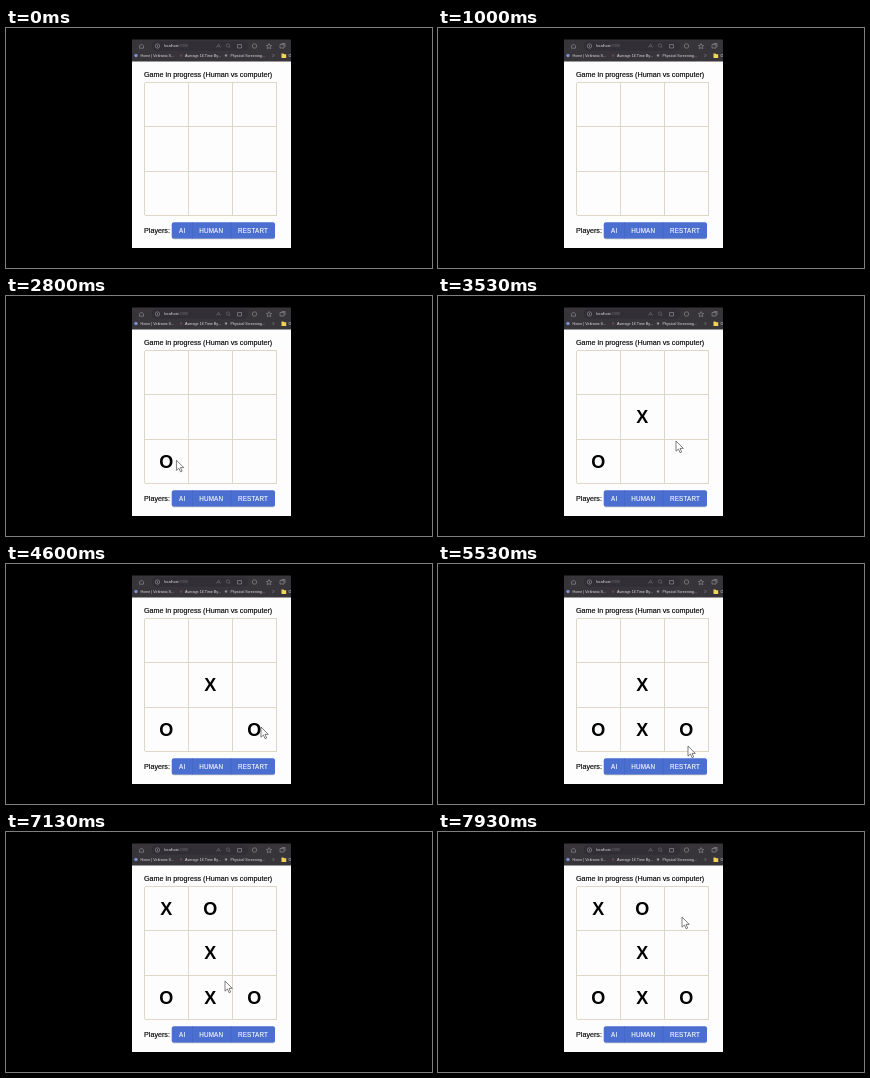
An HTML page for the animation above (8 s loop, 426 px wide and 240 px high).

```html
<!DOCTYPE html>
<html lang="en">
<head>
<meta charset="utf-8">
<title>Tic-tac-toe</title>
<style>
html, body { margin: 0; width: 100%; height: 100%; overflow: hidden; background: #000; }
svg { display: block; width: 100vw; height: 100vh; font-family: "Liberation Sans", Arial, sans-serif; }
.page { font-size: 7.2px; fill: #000; stroke: #000; stroke-width: .15; }
.button { font-size: 6.3px; letter-spacing: .18px; fill: #fff; stroke: #fff; stroke-width: .1; }
.mark { font-size: 18px; font-weight: bold; text-anchor: middle; fill: #000; }
.tiny { font-size: 3.7px; fill: #e4e2e6; }
.icon { fill: none; stroke: #99969c; stroke-width: .6; }
</style>
</head>
<body>
<svg viewBox="0 0 426 240">
  <defs><clipPath id="window"><path d="M126 11h159v209H126z"/></clipPath></defs>
  <path d="M0 0h426v240H0z"/>
  <g clip-path="url(#window)">
    <path d="M126 33h159v187H126z" fill="#fdfdfd"/>
    <path d="M126 11.500h159v22H126z" fill="#37343a"/>
    <rect x="146" y="13.500" width="96" height="9" rx="4" fill="#312e35"/>
    <g class="icon">
      <path d="M133.500 18l2-2 2 2v2.200h-4z"/>
      <circle cx="151.500" cy="18" r="2.200"/><path d="M151.500 17v2.300"/>
      <g opacity=".6">
        <path d="M210.500 19.500l2-3.500 2 3.500M211 18.500h3"/>
        <circle cx="222" cy="17.500" r="1.700"/><path d="M223.200 18.700l1.300 1.300"/>
      </g>
      <path d="M231.500 16.500h4v3.500h-4z"/>
      <circle cx="248.500" cy="18" r="2.200"/>
      <path d="M263 15.500l.8 1.800 1.900.2-1.400 1.300.4 1.900-1.700-1-1.700 1 .4-1.900-1.400-1.300 1.900-.2z"/>
      <path d="M274 16.500h4v3.500h-4zM275.500 15.500h3.500v3.500"/>
      <path d="M266.500 26l1.500 1.500-1.500 1.500"/>
    </g>
    <g class="tiny">
      <text x="158" y="19.300">localhost<tspan fill="#77747b">:3000</tspan></text>
      <circle cx="130" cy="27.500" r="1.700" fill="#7f8fd0"/>
      <text x="134.500" y="28.900">Home | Veltranix S...</text>
      <circle cx="175" cy="27.500" r="1.200" fill="#5f4852"/>
      <text x="179" y="28.900">Average 16 Time By...</text>
      <circle cx="220" cy="27.500" r="1.200" fill="#938f97"/>
      <text x="224.500" y="28.900">Physical Screening...</text>
      <path d="M275.500 25.500h2l.7.800h2v3.700h-4.700z" fill="#f2d45c"/>
      <text x="282.500" y="28.900">Other</text>
    </g>
    <path id="grid" fill="none" stroke="#dcd7c6" shape-rendering="crispEdges"/>
    <g id="marks"></g>
    <text class="page" x="138" y="48.700">Game in progress (Human vs computer)</text>
    <text class="page" x="138" y="204.500">Players:</text>
    <rect x="165.800" y="195.300" width="103.200" height="16" rx="2" fill="#b9bac2"/>
    <rect x="165.800" y="194.300" width="103.200" height="16.200" rx="2" fill="#4b6fd1"/>
    <path d="M186.500 194.300v16.200M225 194.300v16.200" stroke="#4263bd" stroke-width=".6"/>
    <g class="button">
      <text x="173" y="204.600">AI</text>
      <text x="193.200" y="204.600">HUMAN</text>
      <text x="232" y="204.600">RESTART</text>
    </g>
    <path id="cursor" d="M0 0V10.200L2.400 8 4.100 11.700 5.700 11 4 7.400H7.300Z" fill="#fff" stroke="#555" stroke-width=".75" stroke-linejoin="round"/>
  </g>
</svg>
<script>
const LOOP = 8000, LEFT = 138.5, TOP = 54.5, WIDTH = 44, HEIGHT = 44.3;

// time, symbol, column, row
const moves = [
  [2330, "O", 0, 2], [2870, "X", 1, 1],
  [4270, "O", 2, 2], [4870, "X", 1, 2],
  [6200, "O", 1, 0], [6800, "X", 0, 0]
];

// time, x, y
const route = [
  [1330, 136, 216], [1730, 151, 172], [2000, 151, 171], [2600, 154, 169],
  [3130, 205, 154], [3530, 238, 145], [4000, 255, 162], [4600, 255, 163],
  [5100, 251, 178], [5530, 250, 182], [6000, 208, 84], [6470, 207, 81],
  [7130, 219, 149], [7930, 244, 85], [8000, 244, 85]
];

const byId = id => document.getElementById(id);
const cursor = byId("cursor");

byId("grid").setAttribute("d", [0, 1, 2, 3].map(i =>
  `M${LEFT + i * WIDTH} ${TOP}v${3 * HEIGHT}M${LEFT} ${TOP + i * HEIGHT}h${3 * WIDTH}`).join(""));

const marks = moves.map(([time, symbol, col, row]) => {
  const node = document.createElementNS("http://www.w3.org/2000/svg", "text");
  node.setAttribute("class", "mark");
  node.setAttribute("x", LEFT + (col + .5) * WIDTH - .2);
  node.setAttribute("y", TOP + (row + .5) * HEIGHT + 6.4);
  node.textContent = symbol;
  byId("marks").append(node);
  return { time, node };
});

const ease = u => u * u * (3 - 2 * u);
const show = (node, on) => node.setAttribute("visibility", on ? "visible" : "hidden");

function cursorAt(t) {
  const i = route.findIndex(([time]) => time > t);
  const [t0, x0, y0] = route[i - 1], [t1, x1, y1] = route[i];
  const u = ease((t - t0) / (t1 - t0));
  return [x0 + (x1 - x0) * u, y0 + (y1 - y0) * u];
}

function draw(now) {
  const t = now % LOOP;
  marks.forEach(({ time, node }) => show(node, t >= time));
  const visible = t >= route[0][0];
  show(cursor, visible);
  if (visible) cursor.setAttribute("transform", `translate(${cursorAt(t)})`);
}

const start = performance.now();
function tick() {
  draw(performance.now() - start);
  requestAnimationFrame(tick);
}
tick();
</script>
</body>
</html>
```
